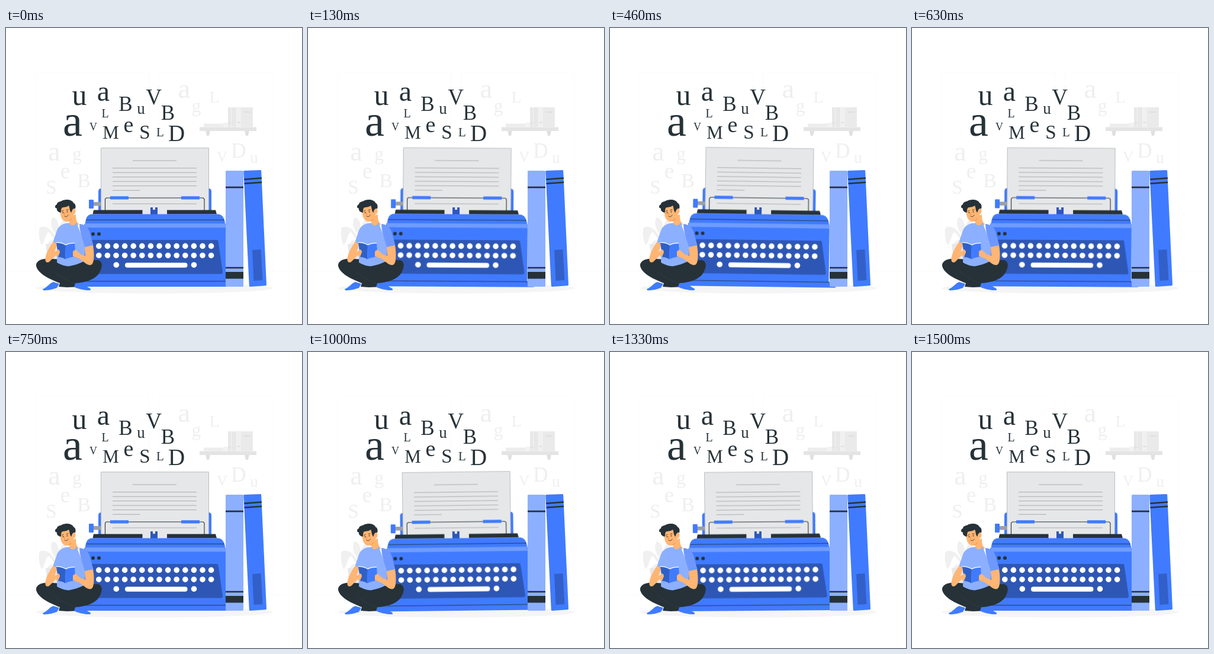
An HTML page for the animation above (1540 ms loop, 500 px wide and 500 px high).

```html
<!DOCTYPE html>
<html lang="en">
<head>
<meta charset="utf-8">
<title>Typewriter</title>
<style>
  html, body { margin: 0; width: 100%; height: 100%; overflow: hidden; background: #fff; }
  svg { display: block; width: 100%; height: 100%; }
  text { font-family: "Liberation Serif", "Times New Roman", serif; text-anchor: middle; }
  .ink { fill: #263238; }
  .blue { fill: #407bff; }
  .light { fill: #8cb0ff; }
  .mid { fill: #6f98ff; }
  .deep { fill: #2e57b5; }
  .skin { fill: #ffb573; }
  .line { fill: none; stroke: #263238; }
  .machine { transform-origin: 250px 320px; animation: wobble 1540ms linear infinite; }
  .keys { fill: none; stroke: #fff; stroke-width: 9.6; stroke-linecap: round; stroke-dasharray: 0 14.6; }
  /* a 1500 ms swing followed by a 40 ms rest */
  @keyframes wobble {
    0%, 97.4%, 100% { transform: rotate(0deg); }
    24.35% { transform: rotate(1deg); }
    73.05% { transform: rotate(-1deg); }
  }
</style>
</head>
<body>
<svg viewBox="0 0 500 500">
  <!-- room -->
  <path d="M0 411H500M50.500 411V75.500H242V411M259 411V75.500H449.500V411" fill="none" stroke="#fafafa" stroke-width=".8"/>
  <ellipse cx="250.500" cy="439.500" rx="200" ry="9" fill="#f5f5f5"/>

  <!-- shelf -->
  <path d="M337 173h8l-2 9h-4zM403 173h8l-2 9h-4z" fill="#e0e0e0"/>
  <path d="M327 167.500h96v6.500h-96z" fill="#e4e4e4"/>
  <path d="M334 161.500h33v6h-33z" fill="#ededed"/>
  <path d="M367 160h8v7.500h-8z" fill="#f2f2f2"/>
  <path d="M375 134h15v33.500h-15z" fill="#e8e8e8"/>
  <path d="M390 133.500h7v34h-7z" fill="#f0f0f0"/>
  <path d="M397 134h20v33.500h-20z" fill="#eaeaea"/>
  <path d="M402 142h11M376 160.500h6M390 159.500h6" stroke="#dcdcdc" stroke-width="1.500"/>
  <path d="M380.500 134v33.500M389.500 134v33.500" stroke="#f3f3f3"/>

  <!-- plant -->
  <g fill="#f0f0f0">
    <path d="M87 352C77 342 73 328 79 320C88 321 91 336 89 350Z"/>
    <path d="M88 355C88 338 92 325 101 321C105 333 98 346 88 355Z"/>
    <path d="M85 357C79 341 67 332 57 337C54 346 56 358 60 367C66 362 66 349 72 344C76 349 81 356 85 360Z"/>
    <path d="M82 360C75 356 69 362 68 373C76 374 81 367 82 360Z"/>
    <path d="M67 365H101L96 397H71Z" fill="#e8e8e8"/>
  </g>

  <!-- faint letters -->
  <g fill="#efefef">
    <text x="301" y="118" font-size="47">a</text>
    <text x="321.500" y="141.500" font-size="31">g</text>
    <text x="352" y="125.500" font-size="28">L</text>
    <text x="365" y="226" font-size="25">V</text>
    <text x="393" y="218.500" font-size="35">D</text>
    <text x="419" y="228" font-size="27">u</text>
    <text x="81.500" y="223.500" font-size="46">a</text>
    <text x="120" y="223" font-size="31">g</text>
    <text x="100" y="254" font-size="37">e</text>
    <text x="76.500" y="280" font-size="33">S</text>
    <text x="131.500" y="268.500" font-size="34">B</text>
  </g>

  <!-- dark letters -->
  <g class="ink">
    <text x="124" y="129.500" font-size="50">u</text>
    <text x="164.500" y="122.500" font-size="48">a</text>
    <text x="202" y="140" font-size="35">B</text>
    <text x="249.500" y="128.500" font-size="37">V</text>
    <text x="167.500" y="150.500" font-size="20">L</text>
    <text x="228" y="145" font-size="27">u</text>
    <text x="273.500" y="154.500" font-size="35">B</text>
    <text x="112.500" y="181.500" font-size="74">a</text>
    <text x="147.500" y="173" font-size="18">V</text>
    <text x="177" y="187" font-size="31">M</text>
    <text x="207" y="176" font-size="38">e</text>
    <text x="234.500" y="186.500" font-size="33">S</text>
    <text x="260.500" y="183" font-size="21">L</text>
    <text x="288" y="191" font-size="39">D</text>
  </g>

  <!-- typewriter -->
  <g class="machine">
    <path class="blue" d="M156 312V276Q156 271 161 271H342Q347 271 347 276V312Z"/>
    <path d="M147 294h14v6.500h-14z" fill="#9aa0a6"/>
    <rect class="blue" x="140" y="290" width="8" height="15" rx="1"/>
    <path d="M160.500 202.700H342.500V316H160.500Z" fill="#e6e7e8" stroke="#a3a7aa" stroke-width=".7"/>
    <path d="M214 224H288M180 236.700H322M180 244.200H322M180 251.700H322M180 259.200H322M180 266.700H322M180 274.300H226.500M180 297H322" stroke="#a3a5a8" stroke-width=".9"/>
    <path class="line" d="M167.500 309V290Q167.500 287 170.500 287H332Q335 287 335 290V309" stroke-width="1.100"/>
    <path class="blue" d="M176 284.200h31v5.400h-31zM296 284.200h31v5.400h-31z"/>
    <path class="ink" d="M148 307.600h82.500v7h-84zM272 307.600h82l2 7h-84z"/>
    <path class="deep" d="M244 303h4v4h4v-4h4v13h-12z"/>
    <path class="blue" d="M145 314.400H358Q368 315 370 329L371 339H132L134 329Q135 315 145 314.400Z"/>
    <path class="blue" d="M132 331H371V437H132Z"/>
    <rect class="blue" x="120" y="428" width="263" height="9" rx="2"/>
    <path d="M133 330.200H370.500L371 337.300H132Z" fill="#6f9cff"/>
    <path class="line" d="M136 324.200H369M124 427.800H380" stroke-width=".9"/>
    <path class="deep" d="M143 358H356Q358 358 358.500 360L366 412Q366 415.500 363 415.500H130Z"/>
    <path class="ink" d="M144 348a3 3 0 1 1 6 0a3 3 0 1 1-6 0M154 348a3 3 0 1 1 6 0a3 3 0 1 1-6 0"/>
    <path class="keys" d="M156.800 368.400H347M156.800 384.200H347"/>
    <g fill="#fff">
      <circle cx="186.300" cy="400.200" r="4.800"/>
      <rect x="201" y="396.400" width="105.500" height="8.300" rx="4"/>
      <circle cx="317.500" cy="400.200" r="4.800"/>
    </g>
  </g>

  <!-- books -->
  <rect class="light" x="371" y="241" width="30" height="196" rx="1.500"/>
  <path class="ink" d="M371 267.700h30v2.800h-30zM371 403.800h30v2.400h-30zM371 412h30v11.500h-30z"/>
  <path class="blue" d="M402.500 241L430 240Q431 240 431.200 241.500L440 433.500Q440 435 438.500 435.200L412.500 437Q411 437 410.800 435.500L401.300 242.500Q401.300 241 402.500 241Z"/>
  <path class="line" d="M402.100 255.800L432 253.500M402.500 262.800L432.200 260.700" stroke-width="2.600"/>
  <path d="M416 375L430.500 374L433.500 426L418.500 427Z" fill="#3260c8"/>

  <!-- reader -->
  <g>
    <path class="blue" d="M62 441C70 438 73 431 80 429L90 432L86 439C79 441.500 69 444 63 443Z"/>
    <path class="blue" d="M115 431L124 429C131 430 135 437 142.500 440L143 443C134 443.500 122 441 114 437Z"/>
    <path class="ink" d="M78 390C60 388 50 394 51 402C54 415 73 424 91 431L89 437L103 438L115 437.500L117 431C136 430 152 424 158 413C163 404 164 394 155 392L128 393Z"/>
    <path class="line" d="M81 411C92 420 104 428 118 432" style="stroke:#38444b" stroke-width=".5"/>
    <path class="skin" d="M105 319L118 315C118 323 119 328 123 331C120 337 110 337 106 332C108 328 107 323 105 319Z"/>
    <path class="light" d="M107 329.500C97 329 89 334 86 342L79.500 361L87 366L86 396C94 401 100 402 106 402.500C115 401 124 398 132 394L134 368L119 328C117 335 110 335 107 329.500Z"/>
    <path class="mid" d="M124 331C135 332 140 338 142 347L147.500 367Q140 371 133 370.500C131 361 124 345 124 331Z"/>
    <path class="skin" d="M79.500 361L87 365L82 378L88 375L91 380L84 384L73 395C68 398 65 394 67 386C69 377 75 368 79.500 361Z"/>
    <path class="skin" d="M133 370L147 367C149 378 149 390 147 396C145 402 140 401 135 398L123 389L114 386L113 377L117 374L126 382L134 385Z"/>
    <path d="M85 362.500Q94 362 101 366.500L100 390.500Q95 387 88.500 387Z" fill="#2f60c8"/>
    <path class="blue" d="M101 366.500Q107 363 116 363.500L117.500 386Q107 387 100 390.500Z"/>
    <path d="M85 362.300Q94 362 101 366.500Q107 363 116 363.300" fill="none" stroke="#fff" stroke-width="1.200"/>
    <path class="skin" d="M84.500 386L86.500 374Q91 374 91 379L88 386ZM113 386V378Q115 374 118 376L121 386Z"/>
    <!-- head -->
    <path class="skin" d="M92 304C91 312 92 321 97 325C102 329 108 327 112 321L114 315C118 314 119 307 115 304L110 297L97 298Z"/>
    <path class="ink" d="M92.500 312C88 311 85 308 86 304.500C82 305 82 299 86 298C86 293 92 294 95 291.500C102 288.500 112 290 114 295.500C118 297 118 302 117 305.500C114 303 111 308 110.500 312C107 309 108 303 106 300C102 303 97 302.500 94.500 303.500C92.500 306 93.500 309 92.500 312Z"/>
    <circle class="ink" cx="96.500" cy="312" r=".9"/>
    <circle class="ink" cx="103.500" cy="310.500" r=".9"/>
    <path class="line" d="M94.500 309.500L97 308.500M102 307.500L105 307M99 318C101 319.500 104 318.500 105 316" stroke-width=".9" stroke-linecap="round"/>
    <path d="M99.500 311.500L98.500 315.500L100 316M110 322Q108 326 105 326.500" fill="none" stroke="#ed893e" stroke-width=".9"/>
  </g>
</svg>
</body>
</html>
```
